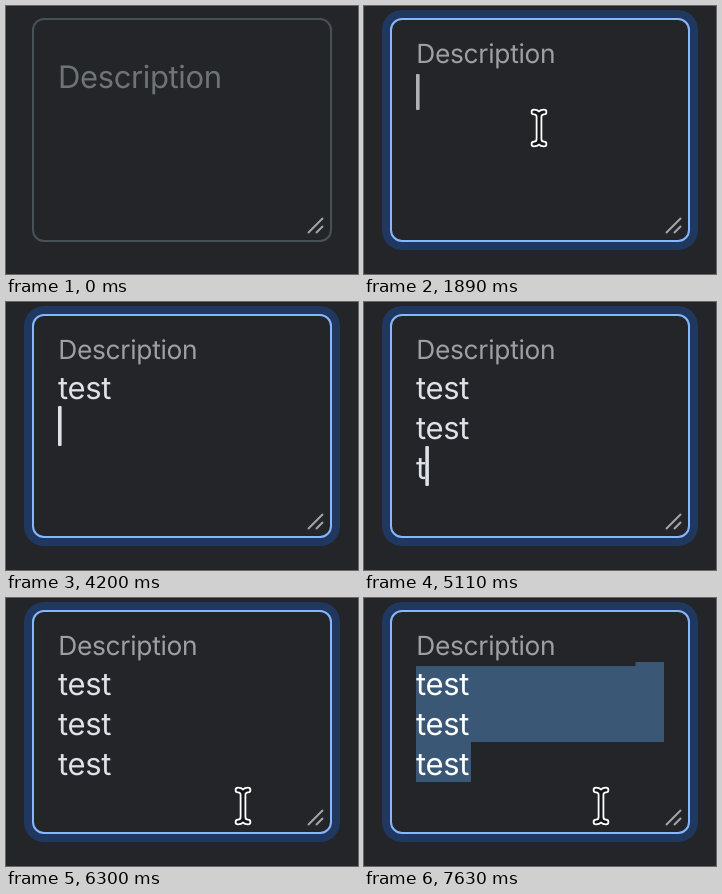
An HTML page that plays this animation: 352x268 px, repeating every 8000 ms.

```html
<!DOCTYPE html>
<html lang="en">
<head>
<meta charset="utf-8">
<title>Floating label textarea</title>
<style>
  html, body { margin: 0; height: 100%; overflow: hidden; background: #232529; }
  svg { display: block; width: 352px; height: 268px; }
  text { font: 31px Inter, "Open Sans", sans-serif; letter-spacing: -.35px; text-rendering: geometricPrecision; }
  #lines, #caret { fill: #dee2e6; }
  #selection { fill: #3a5876; }
  #grip { stroke: #a2a4a6; stroke-width: 2; }
  .beam { fill: none; stroke-linecap: round; }
</style>
</head>
<body>
<svg viewBox="0 0 352 268">
  <defs>
    <path id="beam" d="M-5-16C-2-16 0-14 0-11V11C0 14-2 16-5 16M5-16C2-16 0-14 0-11V11C0 14 2 16 5 16"/>
  </defs>
  <rect id="ring" fill="#20375f"/>
  <rect id="box" x="27" y="13" width="298" height="222" rx="11" fill="#232529" stroke-width="2"/>
  <path id="selection" d="M52 64H300V144H107V184H52Z"/>
  <g id="lines">
    <text x="52" y="97"></text>
    <text x="52" y="137"></text>
    <text x="52" y="177"></text>
  </g>
  <rect id="caret" width="3.6" height="40" rx="1"/>
  <g id="label">
    <rect x="14" y="34" width="270" height="48" fill="#232529"/>
    <text x="26" y="69.5">Description</text>
  </g>
  <path id="grip" d="M302 227L317 212M310 227L317 220"/>
  <g id="pointer">
    <g id="ibeam" class="beam">
      <use href="#beam" stroke="#fff" stroke-width="6.6"/>
      <use href="#beam" stroke="#15161a" stroke-width="3"/>
    </g>
    <path id="arrow" d="M0-12V14L6 8 11 18 15 16 11 7H19Z" fill="#111" stroke="#fff" stroke-width="2"/>
  </g>
</svg>
<script>
const LOOP = 8000, TICK = 70;
const $ = id => document.getElementById(id);
const rows = [...document.querySelectorAll('#lines text')];
const labelText = document.querySelector('#label text');

// "test" three times, one key per entry
const keyTimes = [3570, 3710, 3850, 3990, 4130, 4340, 4410, 4550, 4690, 4830, 5110, 5250, 5390, 5530];
const message = 'test\ntest\ntest';

// Pointer visits: [time, x, y]
const visits = [
  { end: 3710, path: [[70, 216, 204], [210, 198, 163], [420, 175, 122]] },
  { end: LOOP, path: [[5670, 252, 226], [5740, 247, 223], [5880, 237, 208],
    [6650, 237, 208], [6790, 240, 254], [6930, 240, 254], [7000, 237, 212], [7070, 237, 208]] }
];

const ramp = (t, from, to) => Math.min(1, Math.max(0, (t - from) / (to - from)));
const ease = p => p * p * (3 - 2 * p);
const mix = (a, b, p) => a + (b - a) * p;
const blend = (a, b, p) => `rgb(${a.map((v, i) => Math.round(mix(v, b[i], p)))})`;
const show = (el, on) => el.style.visibility = on ? 'visible' : 'hidden';

function set(el, attrs) {
  for (const name in attrs) el.setAttribute(name, attrs[name]);
}

function pointerAt(t) {
  const visit = visits.find(v => t >= v.path[0][0] && t < v.end);
  if (!visit) return null;
  const { path } = visit;
  const next = path.findIndex(p => p[0] > t);
  if (next < 0) return path[path.length - 1].slice(1);
  const [t0, x0, y0] = path[next - 1], [t1, x1, y1] = path[next];
  const p = ramp(t, t0, t1);
  return [mix(x0, x1, p), mix(y0, y1, p)];
}

function caretOpacity(t) {
  if (t < 1330 || t >= 7420) return 0;
  if (t < 2240) return 1 - ramp(t, 1820, 2100);
  if (t < 2870) return ramp(t, 2240, 2450);
  if (t < 3570) return 1 - ramp(t, 2870, 3150);
  if (t < 6510) return 1 - ramp(t, 6020, 6300);
  if (t < 6790) return ramp(t, 6510, 6720);
  return t < 7000 ? 0 : 1;
}

function drawField(t) {
  const float = ease(ramp(t, 1295, 1500));
  const focus = t < 6740 ? float
    : t < 7000 ? 1 - ease(ramp(t, 6740, 6950))
    : ease(ramp(t, 7000, 7210));
  const spread = 8 * focus;
  set($('ring'), {
    x: 26 - spread, y: 12 - spread, width: 300 + 2 * spread, height: 224 + 2 * spread,
    rx: 12 + spread, opacity: focus
  });
  $('box').style.stroke = blend([73, 80, 87], [134, 183, 254], focus);
  const scale = mix(1, .85, float);
  set($('label'), { transform: `translate(${26 + 4.08 * float} ${12 - 13.6 * float}) scale(${scale})` });
  labelText.style.fill = blend([110, 115, 118], [157, 159, 162], float);
}

function drawText(t) {
  const typed = message.slice(0, keyTimes.filter(k => k <= t).length).split('\n');
  rows.forEach((row, i) => row.textContent = typed[i] || '');
  const last = typed.length - 1;
  const width = typed[last] ? rows[last].getComputedTextLength() - .5 : 0;
  set($('caret'), { x: 52 + width, y: 64 + 40 * last, opacity: caretOpacity(t) });
  const selected = t >= 7420;
  show($('selection'), selected);
  $('lines').style.fill = selected ? '#fff' : '';
}

function drawPointer(t) {
  const at = pointerAt(t);
  const outside = !!at && at[1] > 236;
  show($('ibeam'), at && !outside);
  show($('arrow'), outside);
  if (at) set($('pointer'), { transform: `translate(${at})` });
}

function frame(now) {
  const t = Math.floor(now % LOOP / TICK) * TICK;
  drawField(t);
  drawText(t);
  drawPointer(t);
}

let start;
function loop(now) {
  start ??= now;
  frame(now - start);
  requestAnimationFrame(loop);
}
frame(0);
requestAnimationFrame(loop);
</script>
</body>
</html>
```
